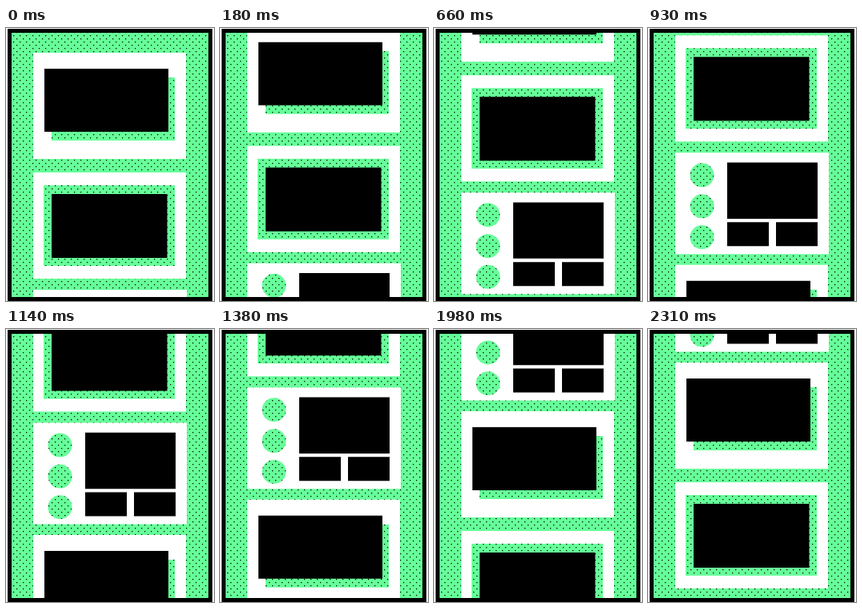
Animation, 260 px wide and 342 px high, one loop 2.34 s. Source, as an HTML page:

```html
<!DOCTYPE html>
<html lang="en">
<head>
<meta charset="utf-8">
<title>Scrolling cards</title>
<style>
  html, body { margin: 0; width: 260px; height: 342px; overflow: hidden; background: #fff; }
  svg { display: block; }
</style>
</head>
<body>
<svg width="260" height="342" viewBox="0 0 260 342">
  <defs>
    <pattern id="dots" width="8" height="8" patternUnits="userSpaceOnUse">
      <rect width="8" height="8" fill="#6f9"/>
      <path d="M1 1h1.3v1.3h-1.3zM5 5h1.3v1.3h-1.3z"/>
    </pattern>
    <clipPath id="screen"><rect x="7" y="6" width="246" height="331"/></clipPath>
    <!-- White cards with holes that show the fixed dotted background -->
    <g id="cards">
      <g fill="#fff" fill-rule="evenodd">
        <path d="M34 31h191v133h-191zM57 62h154v79h-154z"/>
        <path d="M34 181h191v133h-191zM47 197h164v101h-164z"/>
        <path d="M34 328h192v127h-192z
          M52.5 356a15 15 0 0 0 30 0a15 15 0 0 0-30 0
          M52.5 395a15 15 0 0 0 30 0a15 15 0 0 0-30 0
          M52.5 433.7a15 15 0 0 0 30 0a15 15 0 0 0-30 0"/>
      </g>
      <path d="M48 51h155v79h-155z M57 208h144.5v80h-144.5z
        M99 340.3h113v70.4h-113z M99 415h52v30h-52z M160 415h52v30h-52z"/>
    </g>
  </defs>
  <rect x="2" y="1" width="256" height="341"/>
  <g clip-path="url(#screen)">
    <rect x="7" y="6" width="246" height="331" fill="url(#dots)"/>
    <g id="scroller">
      <use href="#cards"/>
      <use href="#cards" y="437.5"/>
    </g>
  </g>
</svg>
<script>
  const LOOP = 2340, STEP = 30, SPEED = 437.5 / 79;
  const scroller = document.getElementById('scroller');

  function draw() {
    const step = Math.floor(performance.now() % LOOP / STEP);
    scroller.setAttribute('transform', `translate(0 ${-step * SPEED})`);
    requestAnimationFrame(draw);
  }
  draw();
</script>
</body>
</html>
```
